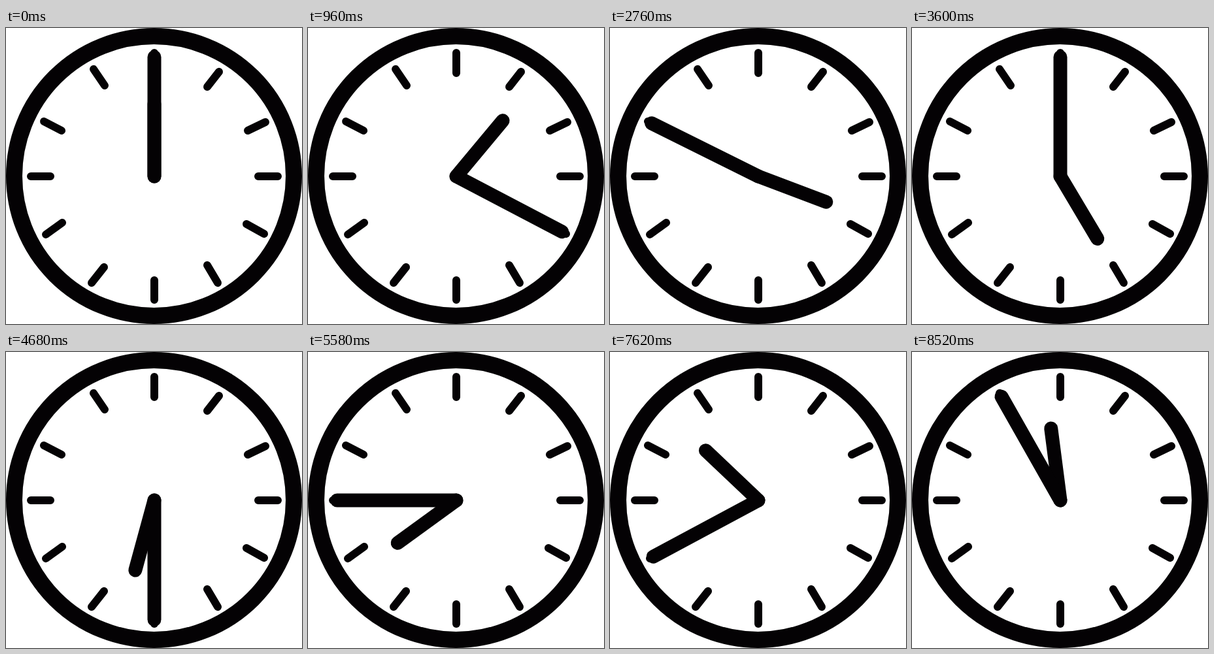
Recreate the animation shown at these times as an HTML page. Size 453 px wide and 453 px high, loop 8580 ms.

```html
<!DOCTYPE html>
<html>
<head>
<meta charset="utf-8">
<title>Clock</title>
<style>
  html, body { margin: 0; width: 100%; height: 100%; overflow: hidden; background: #fff; }
  svg { display: block; width: 100vw; height: 100vh; fill: none; stroke: #040204; stroke-linecap: round; }
</style>
</head>
<body>
<svg viewBox="0 0 453 453">
  <circle cx="226.5" cy="226.5" r="214" stroke-width="25"/>
  <path id="ticks" stroke-width="12"/>
  <g stroke-width="21">
    <path id="hour" d="M227 227V116"/>
    <path id="minute" d="M227 227V44.5"/>
  </g>
</svg>
<script>
const CENTER = 227, STEP = 60, FRAMES = 143;
const byId = id => document.getElementById(id);

// Slightly uneven hand-placed marks: outer x, y, inner x, y, from 12 o'clock on
const marks = [
  [227, 38, 227, 69], [326, 67, 308, 90], [397, 144, 370, 157],
  [416, 227, 386, 227], [395, 315, 368, 300], [324, 390, 308, 363],
  [227, 416, 227, 386], [131, 390, 150, 366], [61, 316, 86, 298],
  [38, 227, 68, 227], [58, 143, 85, 157], [134, 63, 151, 88]
];
byId('ticks').setAttribute('d', marks.map(([a, b, c, d]) => `M${a} ${b}L${c} ${d}`).join(''));

const angles = marks.map(([x, y]) =>
  (Math.atan2(x - CENTER, CENTER - y) * 180 / Math.PI + 360) % 360);
angles.push(360);

// Angle at a fractional hour, following the spacing of the marks
function dialAngle(h) {
  const i = Math.floor(h);
  return angles[i] + (angles[i + 1] - angles[i]) * (h - i);
}

function turn(id, angle) {
  byId(id).setAttribute('transform', `rotate(${angle} ${CENTER} ${CENTER})`);
}

const start = performance.now();
function draw() {
  const elapsed = Math.max(0, performance.now() - start);
  const frame = Math.floor(elapsed / STEP) % FRAMES;
  const tick = frame < 120 ? frame : frame + 1; // ten o'clock is skipped
  turn('minute', angles[tick % 12]);
  turn('hour', dialAngle(Math.floor(tick / 3) / 4)); // moves every quarter hour
  requestAnimationFrame(draw);
}
draw();
</script>
</body>
</html>
```
